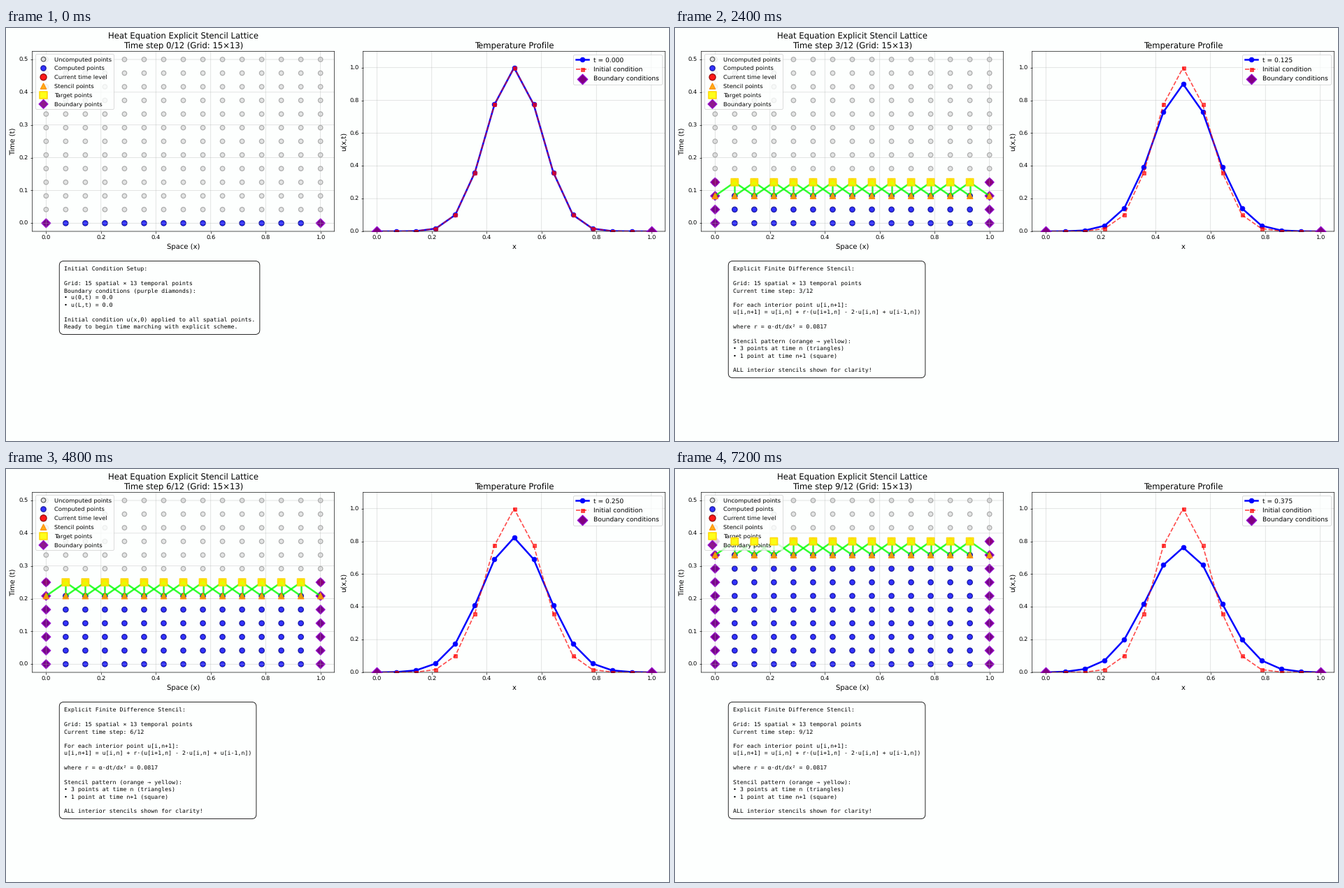
Write a matplotlib script that moves like this. It is 948 px wide and 591 px high and loops after 8000 ms.

```python
import numpy as np
import matplotlib.pyplot as plt
from matplotlib.animation import FuncAnimation
from matplotlib.collections import LineCollection
from matplotlib.patches import FancyBboxPatch
from matplotlib.transforms import IdentityTransform

W, H, DPI = 948, 591, 60
NX, NT, STEPS = 15, 13, 10
ALPHA, T_END = 0.01, 0.5
PAPER = "#fdfffe"

x = np.linspace(0, 1, NX)
t = np.linspace(0, T_END, NT)
r = ALPHA * (t[1] - t[0]) / (x[1] - x[0]) ** 2

# Explicit time marching with fixed zero ends
u = np.zeros((NT, NX))
u[0] = np.exp(-50 * (x - 0.5) ** 2)
u[0, [0, -1]] = 0
for n in range(NT - 1):
    u[n + 1, 1:-1] = u[n, 1:-1] + r * (u[n, 2:] - 2 * u[n, 1:-1] + u[n, :-2])

plt.rcParams.update({"font.family": "DejaVu Sans",
                     "text.hinting": "no_hinting",
                     "axes.facecolor": PAPER})
fig = plt.figure(figsize=(W / DPI, H / DPI), dpi=DPI, facecolor=PAPER)


def add_axes(left, right, top, bottom):
    """Axes placed by pixel edges measured from the top left."""
    return fig.add_axes([left / W, 1 - bottom / H,
                         (right - left) / W, (bottom - top) / H])


def style(ax, xlabel, ylabel, ylim, yticks):
    ax.set_xlim(-0.05, 1.05)
    ax.set_ylim(*ylim)
    ax.set_xticks(np.arange(0, 1.01, 0.2))
    ax.set_yticks(yticks)
    ax.set_xlabel(xlabel, fontsize=12)
    ax.set_ylabel(ylabel, fontsize=12)
    ax.grid(True, alpha=0.5)
    for line in [*ax.spines.values(), *ax.get_xgridlines(), *ax.get_ygridlines()]:
        line.set_snap(False)


def grid_points(cols, rows):
    gx, gy = np.meshgrid(x[cols], t[rows])
    return np.column_stack([gx.ravel(), gy.ravel()])


# Lattice panel
lat = add_axes(37.7, 469.3, 33.3, 291)
style(lat, "Space (x)", "Time (t)", (-0.025, 0.525), np.arange(0, 0.51, 0.1))
lat_title = lat.set_title("", fontsize=14)


def layer(label, color, edge, size, marker="o", width=1.5, **kw):
    points = lat.scatter([], [], s=size, c=color, edgecolors=edge,
                         marker=marker, label=label, **kw)
    # A repeated width makes Agg keep sub-pixel marker positions
    points.set_linewidth([width, width])
    points.set_snap(False)
    return points


uncomputed = layer("Uncomputed points", "lightgray", "gray", 60, alpha=0.6)
computed = layer("Computed points", "blue", "darkblue", 80, alpha=0.8)
current = layer("Current time level", "red", "darkred", 120, alpha=0.9)
stencil = layer("Stencil points", "orange", "darkorange", 100, "^",
                alpha=0.9, zorder=8)
target = layer("Target points", "yellow", "gold", 150, "s", 2,
               alpha=0.9, zorder=10)
boundary = layer("Boundary points", "purple", "darkviolet", 120, "D",
                 alpha=0.9)
links = LineCollection([], colors="lime", linewidths=3, alpha=0.8,
                       capstyle="projecting", zorder=2)
lat.add_collection(links, autolim=False)
lat_legend = lat.legend(loc="upper left", fontsize=10, labelspacing=0.61)
lat_legend.legend_handles[0].set_edgecolor("black")

# Profile panel
prof = add_axes(510.7, 942.3, 33.3, 291)
style(prof, "x", "u(x,t)", (0, 1.1), np.arange(0, 1.01, 0.2))
prof.set_title("Temperature Profile", fontsize=14)
curve, = prof.plot(x, u[0], "b-o", linewidth=3, markersize=8,
                   label="t = 0.000")
prof.plot(x, u[0], "r--s", linewidth=2, markersize=6, alpha=0.7,
          label="Initial condition")
prof.scatter([0, 1], [0, 0], s=150, c="purple", edgecolors="darkviolet",
             marker="D", linewidths=1.5, zorder=5,
             label="Boundary conditions")
time_label = prof.legend(loc="upper right", fontsize=11,
                         labelspacing=0.52).get_texts()[0]

# Explanation box, laid out in pixels
NOTE_X, NOTE_TOP = 82.9, 333.4
CHAR_W, LINE_H, TEXT_H, PAD = 4.969, 10.35, 9, 6.67
PIXELS = IdentityTransform()
note_box = FancyBboxPatch((0, 0), 1, 1, facecolor=PAPER, edgecolor="black",
                          boxstyle=f"round,pad=0,rounding_size={PAD}",
                          linewidth=1, transform=PIXELS)
fig.add_artist(note_box)
first_baseline = H - NOTE_TOP - PAD - 6.75
note_lines = [fig.text(NOTE_X, first_baseline - i * LINE_H, "", fontsize=9.9,
                       family="DejaVu Sans Mono", transform=PIXELS)
              for i in range(15)]

GRID_LINE = f"Grid: {NX} spatial × {NT} temporal points"


def note_text(n):
    if n == 0:
        return ["Initial Condition Setup:", "", GRID_LINE,
                "Boundary conditions (purple diamonds):",
                "• u(0,t) = 0.0", "• u(L,t) = 0.0", "",
                "Initial condition u(x,0) applied to all spatial points.",
                "Ready to begin time marching with explicit scheme."]
    return ["Explicit Finite Difference Stencil:", "", GRID_LINE,
            f"Current time step: {n}/{NT - 1}", "",
            "For each interior point u[i,n+1]:",
            "u[i,n+1] = u[i,n] + r·(u[i+1,n] - 2·u[i,n] + u[i-1,n])", "",
            f"where r = α·dt/dx² = {r:.4f}", "",
            "Stencil pattern (orange → yellow):",
            "• 3 points at time n (triangles)",
            "• 1 point at time n+1 (square)", "",
            "ALL interior stencils shown for clarity!"]


def show_note(lines):
    width = max(map(len, lines)) * CHAR_W + 2 * PAD
    height = (len(lines) - 1) * LINE_H + TEXT_H + 2 * PAD
    note_box.set_bounds(NOTE_X - PAD, H - NOTE_TOP - height, width, height)
    for i, artist in enumerate(note_lines):
        artist.set_text(lines[i] if i < len(lines) else "")


ALL, INNER, ENDS = slice(None), slice(1, -1), [0, -1]
EMPTY = np.empty((0, 2))


def update(n):
    lat_title.set_text("Heat Equation Explicit Stencil Lattice\n"
                       f"Time step {n}/{NT - 1} (Grid: {NX}×{NT})")
    uncomputed.set_offsets(grid_points(ALL, slice(n + 1, None)))
    computed.set_offsets(grid_points(ALL, slice(0, max(n, 1))))
    boundary.set_offsets(grid_points(ENDS, slice(0, n + 1)))
    if n:
        now, before = slice(n, n + 1), slice(n - 1, n)
        current.set_offsets(grid_points(ALL, now))
        stencil.set_offsets(grid_points(ALL, before))
        target.set_offsets(grid_points(INNER, now))
        links.set_segments([[(x[i + d], t[n - 1]), (x[i], t[n])]
                            for i in range(1, NX - 1) for d in (-1, 0, 1)])
    else:
        for part in (current, stencil, target):
            part.set_offsets(EMPTY)
        links.set_segments([])
    curve.set_ydata(u[n])
    time_label.set_text(f"t = {t[n]:.3f}")
    show_note(note_text(n))
    return []


anim = FuncAnimation(fig, update, frames=STEPS, interval=800,
                     init_func=lambda: update(0), repeat=True,
                     repeat_delay=0, blit=False)
plt.show()
```
